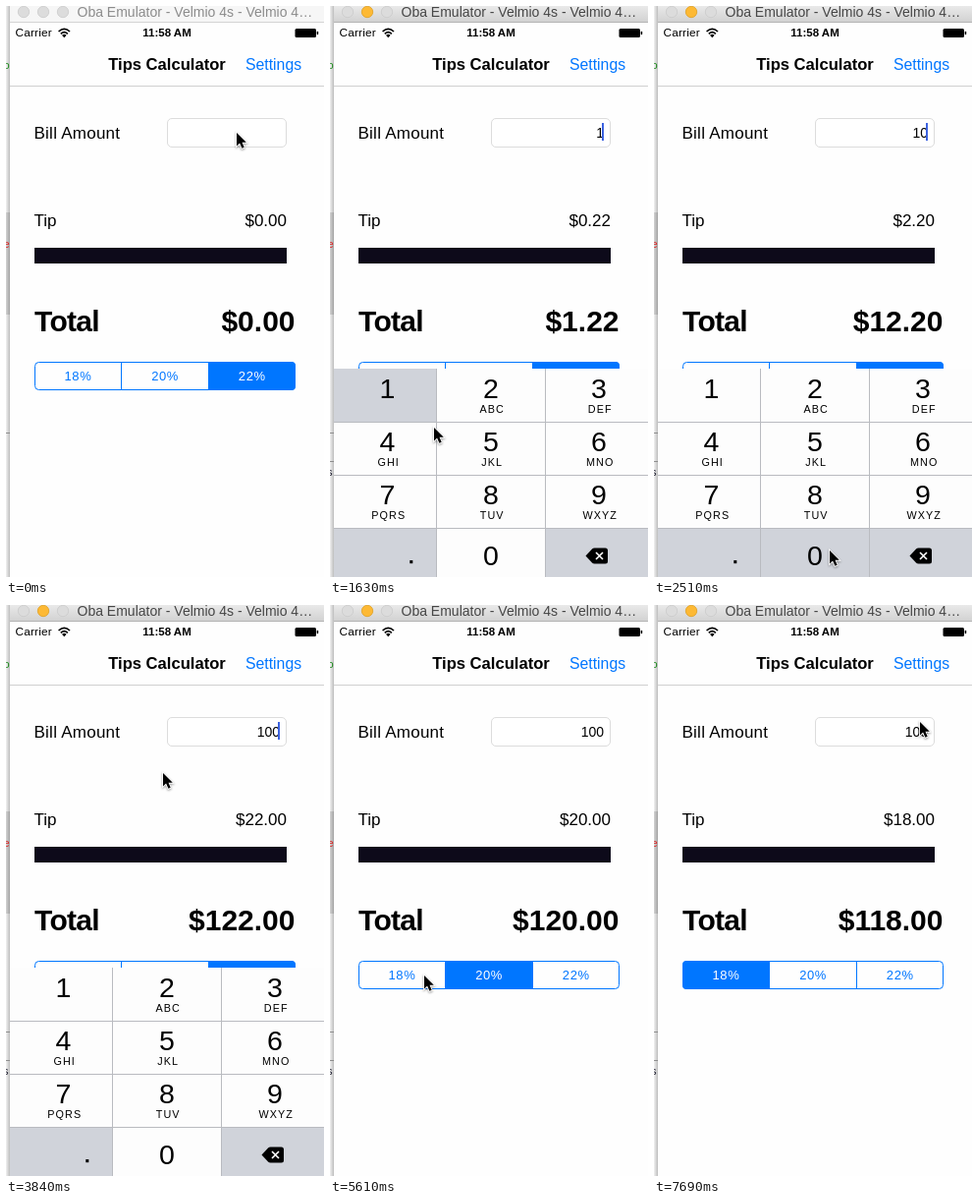
These frames come from a looping animation (324 px wide and 581 px high, 7990 ms). An HTML page:

```html
<!DOCTYPE html>
<html lang="en">
<head>
<meta charset="utf-8">
<title>Tips Calculator</title>
<style>
  html, body { margin: 0; width: 100%; height: 100%; overflow: hidden; background: #fff; }
  svg { display: block; width: 100vw; height: 100vh; }
  text { font-family: "Liberation Sans", Arial, sans-serif; white-space: pre; }
  .pointer { filter: drop-shadow(0 1px 1px rgba(0, 0, 0, .4)); }
</style>
</head>
<body>
<svg id="stage" viewBox="0 0 324 581" preserveAspectRatio="none"></svg>
<script>
const LOOP = 7990, STEP = 147.8, FIRST = 284;
const BLUE = '#0076ff', KEY = '#d0d3da', LINE = '#b9bbc0', PAGE = '#fefefe';
const svg = document.getElementById('stage');

function el(name, attrs, parent = svg, text) {
  const node = document.createElementNS('http://www.w3.org/2000/svg', name);
  set(node, attrs);
  if (text !== undefined) node.textContent = text;
  parent.appendChild(node);
  return node;
}
function set(node, attrs) {
  for (const key in attrs) node.setAttribute(key, attrs[key]);
}
const rect = (x, y, width, height, fill, parent, more) =>
  el('rect', { x, y, width, height, fill, ...more }, parent);
const label = (text, x, y, size, more, parent) =>
  el('text', { x, y, 'font-size': size, fill: '#000', ...more }, parent, text);
const show = (node, on) => node.setAttribute('visibility', on ? 'visible' : 'hidden');
function gradient(id, from, to, across) {
  const g = el('linearGradient', { id, x2: across ? 1 : 0, y2: across ? 0 : 1 });
  el('stop', { offset: 0, 'stop-color': from }, g);
  el('stop', { offset: 1, 'stop-color': to }, g);
}

const BOLD = { 'font-weight': 700 };
const END = { 'text-anchor': 'end' };
const MID = { 'text-anchor': 'middle' };

// Window behind
gradient('shade', '#f0f0f0', '#bdbdbd', true);
gradient('chrome', '#e9e9e9', '#d2d2d2');
rect(0, 0, 4, 581, 'url(#shade)');
rect(0, 210, 4, 104, '#000', svg, { opacity: 0.13 });
rect(0, 434, 4, 1, '#8e8e8e');
const backLine = rect(0, 463, 4, 1, '#8e8e8e');
label('o', -2.5, 64, 11, { fill: '#1d8a1d' });
label('e', -2.5, 246, 11, { fill: '#d22' });
const backDark = label('s', -3, 478, 11, { fill: '#223' });

// Title bar
rect(4, 0, 320, 581, PAGE);
const bar = rect(4, 0, 320, 16, '#f6f6f6');
const barLine = rect(4, 16, 320, 1, '#d4d4d4');
const lights = [18, 38, 58].map(cx =>
  el('circle', { cx, cy: 6, r: 5.7, fill: '#dcdcdc', stroke: '#cbcbcb', 'stroke-width': 0.8 }));
const title = label('Oba Emulator - Velmio 4s - Velmio 4…', 72.5, 11, 14);

// Status bar
label('Carrier', 9.5, 31, 11.8, { 'letter-spacing': 0.2 });
const wifi = el('g', { fill: 'none', stroke: '#000', 'stroke-width': 1.7 });
el('path', { d: 'M53.6 26Q59.3 20.6 65 26M55.8 28.4Q59.3 25 62.8 28.4' }, wifi);
el('path', { d: 'M57 29.8Q59.3 27.8 61.6 29.8L59.3 32.2Z', fill: '#000', stroke: 'none' }, wifi);
label('11:58 AM', 164, 31, 11.5, { ...BOLD, ...MID });
rect(294.5, 23, 21.5, 9, '#000', svg, { rx: 1.5 });
rect(316.7, 25.7, 1.5, 3.6, '#000', svg, { rx: 0.7 });

// Navigation bar and form
label('Tips Calculator', 164, 65, 16.6, { ...BOLD, ...MID });
label('Settings', 244, 65, 15.8, { fill: BLUE });
rect(4, 81, 320, 1, '#d0d0d0');
label('Bill Amount', 28.5, 134.5, 17, { 'letter-spacing': 0.25 });
rect(164.5, 114.5, 121, 29, '#fff', svg, { rx: 4.5, stroke: '#dcdcdc' });
const bill = label('', 279, 133.5, 14, END);
const caret = rect(277, 119, 2, 18, '#3c62e0');
label('Tip', 28.5, 223.5, 17);
const tip = label('', 286, 223.5, 17, END);
rect(29, 246, 257, 16, '#0d0a1a');
label('Total', 29, 330.5, 30, { ...BOLD, 'letter-spacing': -0.7 });
const total = label('', 294.5, 330.5, 30, { ...BOLD, ...END });

// Rate switch
const clip = el('clipPath', { id: 'round' });
rect(29, 362, 266, 29, '#000', clip, { rx: 4 });
const segs = [18, 20, 22].map((rate, i) => {
  const x = 29 + i * 88.67;
  return {
    rate,
    box: rect(x, 362, 88.67, 29, BLUE, svg, { 'clip-path': 'url(#round)' }),
    text: label(rate + '%', x + 44.4, 381, 13, { ...MID, 'letter-spacing': 0.6 })
  };
});
rect(29.5, 362.5, 265, 28, 'none', svg, { rx: 4, stroke: BLUE });
for (const x of [117, 206]) rect(x, 362, 1, 29, BLUE);

// Number pad
const pad = el('g', {});
const cols = [4, 109, 220, 324], mids = [58.5, 164, 274];
rect(4, 369, 320, 216, '#fdfdfd', pad);
rect(4, 531, 105, 54, KEY, pad);
rect(220, 531, 104, 54, KEY, pad);
const press = rect(0, 0, 0, 54, KEY, pad);
for (const y of [423, 477, 531]) rect(4, y, 320, 1, LINE, pad);
for (const x of [108, 219]) rect(x, 369, 1, 216, LINE, pad);
['', 'ABC', 'DEF', 'GHI', 'JKL', 'MNO', 'PQRS', 'TUV', 'WXYZ'].forEach((letters, i) => {
  const x = mids[i % 3], y = 369 + 54 * Math.floor(i / 3);
  label(i + 1, x, y + 30, 28.5, MID, pad);
  label(letters, x + 1.2, y + 45, 10.8, { ...MID, 'letter-spacing': 1.1 }, pad);
});
label('0', 164, 568.5, 28.5, MID, pad);
rect(81.3, 564, 3, 3.2, '#000', pad);
el('path', { d: 'M260.5 559.5L267 552.5Q268 551.5 269.5 551.5H280.5Q283 551.5 283 554V565Q283 567.5 280.5 567.5H269.5Q268 567.5 267 566.5Z' }, pad);
el('path', { d: 'M271 556L278 563M278 556L271 563', stroke: '#fff', 'stroke-width': 1.6 }, pad);

// Pointer
const pointer = el('g', { class: 'pointer' });
el('path', {
  d: 'M0 0V13.5L3.1 10.6L5.4 15.8L7.7 14.8L5.5 9.8H9.8Z',
  stroke: '#fff', 'stroke-width': 1.7, 'paint-order': 'stroke'
}, pointer);

// Step, x, y of the pointer tip
const route = [
  [0, 235, 129], [4, 235, 129], [6, 80, 395], [8, 80, 395], [9, 106, 429],
  [11, 179, 554], [16, 179, 554], [17, 172, 437], [20, 161, 190], [21, 160, 171],
  [25, 160, 171], [29, 150, 369], [34, 150, 372], [36, 96, 377], [37, 75, 380],
  [39, 75, 380], [41, 248, 381], [42, 248, 381], [43, 281, 323], [46, 291, 75],
  [48, 240, 98], [50, 271, 119]
];
const bills = [[-1, ''], [8, '1'], [14, '10'], [16, '100']];
const rates = [[-1, 22], [32, 20], [38, 18]];
const slides = [[-1, 216], [2, 130], [3, 15.5], [4, 0], [25, 130], [26, 204], [27, 216]];

const at = (list, k) => list.filter(item => item[0] <= k).pop()[1];
const within = (k, from, to) => k >= from && k <= to;
const money = n => '$' + n.toFixed(2);

function along(k) {
  const next = route.findIndex(p => p[0] > k);
  if (next < 0) return route[route.length - 1].slice(1);
  if (next === 0) return route[0].slice(1);
  const a = route[next - 1], b = route[next];
  const f = (k - a[0]) / (b[0] - a[0]);
  return [a[1] + (b[1] - a[1]) * f, a[2] + (b[2] - a[2]) * f];
}

function draw(ms) {
  const k = Math.max(-1, Math.floor((ms - FIRST) / STEP));
  const active = k >= 0;
  set(bar, { fill: active ? 'url(#chrome)' : '#f6f6f6' });
  set(barLine, { fill: active ? '#b4b4b4' : '#d4d4d4' });
  set(title, { fill: active ? '#464646' : '#8c8c8c' });
  set(lights[1], { fill: active ? '#fdb934' : '#dcdcdc', stroke: active ? '#dfa023' : '#cbcbcb' });
  show(backLine, active);
  show(backDark, active);

  const amount = at(bills, k), rate = at(rates, k);
  bill.textContent = amount;
  tip.textContent = money(amount * rate / 100);
  total.textContent = money(amount * (1 + rate / 100));
  show(caret, within(k, 2, 24) && !within(k, 19, 22));
  for (const s of segs) {
    const on = s.rate === rate;
    set(s.box, { fill: on ? BLUE : PAGE });
    set(s.text, { fill: on ? '#fff' : BLUE });
  }

  set(pad, { transform: `translate(0 ${at(slides, k)})` });
  const one = within(k, 7, 9);
  const col = one ? 0 : 1;
  set(press, { x: cols[col], y: one ? 369 : 531, width: cols[col + 1] - cols[col] });
  show(press, one || within(k, 14, 16));

  const [x, y] = along(k);
  set(pointer, { transform: `translate(${x} ${y})` });
  show(pointer, !within(k, 44, 45));
}

function tick() {
  draw(performance.now() % LOOP);
  requestAnimationFrame(tick);
}
tick();
</script>
</body>
</html>
```
